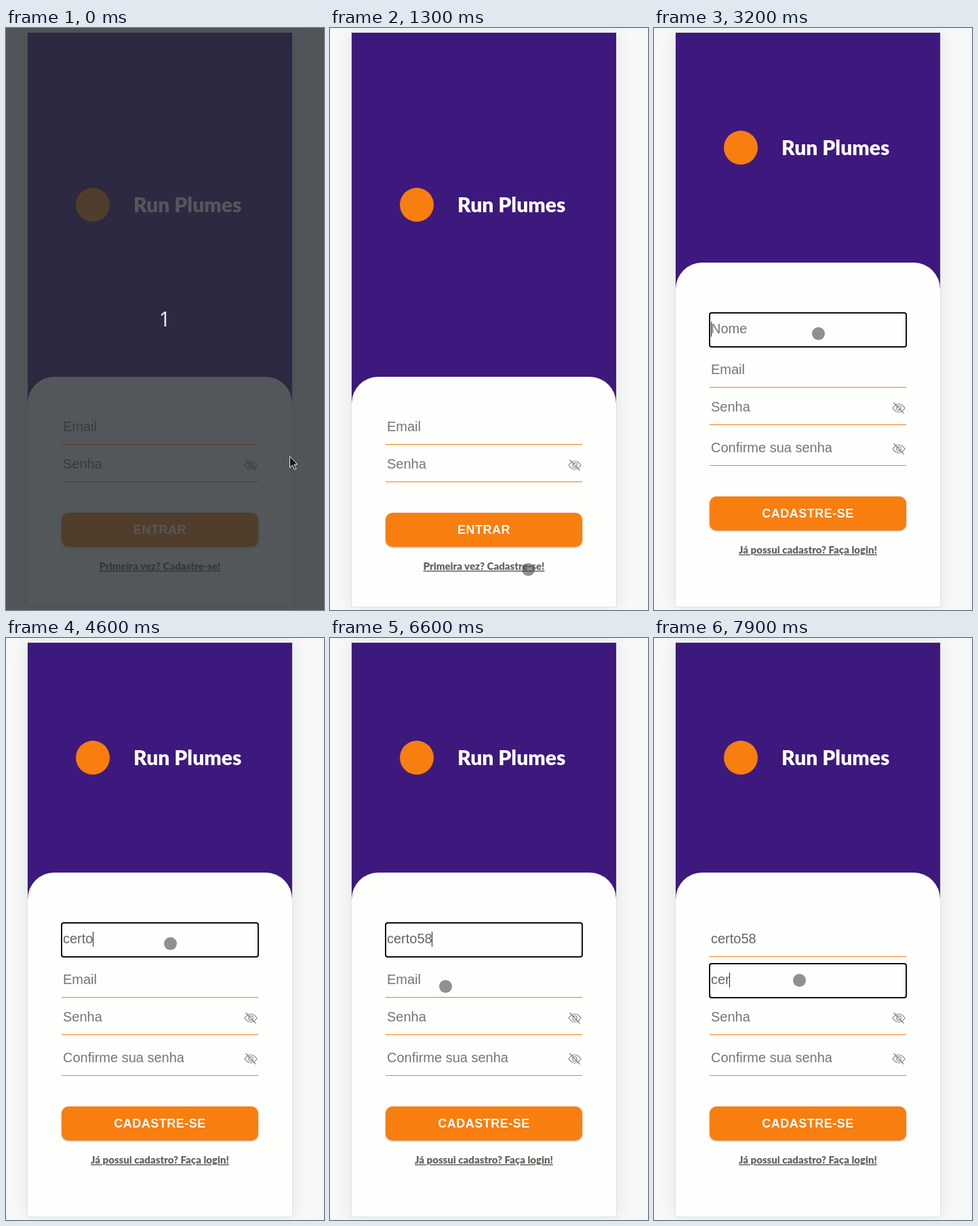
An HTML page that plays this animation: 469 by 856 pixels, repeating every 8 s.

```html
<!DOCTYPE html>
<html lang="pt-BR">
<head>
<meta charset="utf-8">
<title>Cadastro</title>
<style>
  html, body { margin: 0; width: 100%; height: 100%; overflow: hidden; background: #f7f9f8; }
  svg { display: block; width: 100vw; height: 100vh; }
  .phone { fill: #fefefd; stroke: #dfe1e0; filter: drop-shadow(0 0 12px rgba(0, 0, 0, .08)); }
  .purple { fill: #3d197d; }
  .card { fill: #fefefd; }
  .accent { fill: #f87e0f; }
  .button { fill: #f87e0f; filter: drop-shadow(0 1px 1px rgba(0, 0, 0, .35)); }
  .field { font: 20px "Liberation Sans", Arial, sans-serif; fill: #757575; }
  .field.filled { fill: #666460; }
  .label { font: bold 18px "Liberation Sans", Arial, sans-serif; letter-spacing: .5px; fill: #fff; }
  .title { font: 900 30px Lato, sans-serif; fill: #fff; }
  .link { font: 900 15px Lato, sans-serif; fill: #62645f; text-decoration: underline; }
  .label, .link { text-anchor: middle; }
  .eye { fill: none; stroke: #7c7c7c; stroke-width: 1.1; }
  .count { font: 30px "Noto Sans", sans-serif; fill: #e0e9f0; text-anchor: middle; }
  .ring { fill: #fefefd; stroke: #101010; stroke-width: 2; }
</style>
</head>
<body>
<svg viewBox="0 0 469 856">
  <defs>
    <g id="brand">
      <circle class="accent" cx="128" cy="260" r="25"/>
      <text class="title" x="188" y="271">Run Plumes</text>
    </g>
    <g id="eye" class="eye">
      <path d="M-9 0Q-5-6 0-6T9 0Q5 6 0 6T-9 0Z"/>
      <circle r="3.2"/>
      <path d="M-7.5-8 7.5 8"/>
    </g>
  </defs>
  <rect class="phone" x="31.5" y="6.5" width="391" height="845"/>
  <g id="login"></g>
  <g id="register"></g>
  <rect id="caret" width="1" height="22" fill="#222"/>
  <circle id="pointer" r="9.5" fill="#3c3e3c" fill-opacity=".57"/>
  <g id="cover">
    <rect width="469" height="856" fill="#292d33" fill-opacity=".8"/>
    <text class="count" x="234" y="439">1</text>
    <path d="M418.500 630v16.500l4-3.500 3 6.500 2.500-1-3-6.500h5z" fill="#15171a" stroke="#eee"/>
  </g>
</svg>
<script>
const LOOP = 8000, TICK = 100, LEFT = 84;
const $ = id => document.getElementById(id);

const fieldMarkup = ({ name, line, secret }) => `
  <rect class="accent" x="82" y="${line}" width="290" height="1"/>
  <rect class="ring" x="82" y="${line - 49}" width="290" height="50" rx="3" visibility="hidden"/>
  <text class="field" x="${LEFT}" y="${line - 19}">${name}</text>
  ${secret ? `<use href="#eye" x="361" y="${line - 24}"/>` : ''}`;

const screenMarkup = ({ top, brandShift, fields, buttonTop, action, link }) => `
  <rect class="purple" x="32" y="7" width="390" height="${top + 33}"/>
  <path class="card" d="M32 851V${top + 39}a39 39 0 0 1 39-39H383a39 39 0 0 1 39 39V851Z"/>
  <use href="#brand" y="${brandShift}"/>
  ${fields.map(fieldMarkup).join('')}
  <rect class="button" x="82" y="${buttonTop}" width="290" height="50" rx="10"/>
  <text class="label" x="227" y="${buttonTop + 31}">${action}</text>
  <text class="link" x="227" y="${buttonTop + 84}">${link}</text>`;

$('login').innerHTML = screenMarkup({
  top: 513, brandShift: 0, buttonTop: 713,
  fields: [{ name: 'Email', line: 612 }, { name: 'Senha', line: 667, secret: true }],
  action: 'ENTRAR', link: 'Primeira vez? Cadastre-se!'
});
$('register').innerHTML = screenMarkup({
  top: 345, brandShift: -84, buttonTop: 689,
  fields: [
    { name: 'Nome', line: 468 }, { name: 'Email', line: 528 },
    { name: 'Senha', line: 583, secret: true },
    { name: 'Confirme sua senha', line: 643, secret: true }
  ],
  action: 'CADASTRE-SE', link: 'Já possui cadastro? Faça login!'
});

// The pointer eases to each stop, arriving at its end time.
const origin = { x: 419.5, y: 631.5 };
const stops = [
  { end: 1000, time: 600, x: 288.5, y: 805.5 },
  { end: 1300, time: 200, x: 292.5, y: 796.5 },
  { end: 2400, time: 300, x: 275.5, y: 581.5 },
  { end: 2800, time: 200, x: 242.5, y: 449.5 },
  { end: 6100, time: 300, x: 157.5, y: 536.5 },
  { end: 6400, time: 200, x: 170.5, y: 512.5 },
  { end: 7500, time: 300, x: 214.5, y: 503.5 }
];
const inputs = [
  { focus: 3200, bursts: [{ text: 'certo', start: 3900, pace: 175 }, { text: '58', start: 5400, pace: 300 }] },
  { focus: 6700, bursts: [{ text: 'cer', start: 7700, pace: 100 }] }
];
const labels = [...$('register').querySelectorAll('.field')];
const rings = [...$('register').querySelectorAll('.ring')];
const placeholders = labels.map(label => label.textContent);

const clamp = u => Math.min(1, Math.max(0, u));
const ease = u => u * u * (3 - 2 * u);
const show = (node, on) => node.setAttribute('visibility', on ? 'visible' : 'hidden');

const pointerAt = t => stops.reduce((p, { end, time, x, y }) => {
  const u = ease(clamp((t - end + time) / time));
  return { x: p.x + (x - p.x) * u, y: p.y + (y - p.y) * u };
}, origin);

function typedAt({ focus, bursts }, t) {
  let value = '', lastKey = focus;
  for (const { text, start, pace } of bursts) {
    if (t < start) break;
    const count = Math.min(text.length, Math.floor((t - start) / pace) + 1);
    value += text.slice(0, count);
    lastKey = start + (count - 1) * pace;
  }
  return { value, lastKey };
}

const caretLit = idle => idle % 900 < 600;

function render(now) {
  const t = Math.floor(now % LOOP / TICK) * TICK;
  const registering = t >= 1800;
  show($('cover'), t < TICK);
  show($('pointer'), t >= TICK);
  $('login').style.display = registering ? 'none' : '';
  $('register').style.display = registering ? '' : 'none';

  const { x, y } = pointerAt(t);
  $('pointer').setAttribute('transform', `translate(${x} ${y})`);

  const focused = inputs.findLastIndex(input => t >= input.focus);
  show($('caret'), false);
  inputs.forEach((input, i) => {
    const { value, lastKey } = typedAt(input, t);
    labels[i].textContent = value || placeholders[i];
    labels[i].classList.toggle('filled', value !== '');
    show(rings[i], i === focused);
    if (i !== focused) return;
    const width = value ? labels[i].getComputedTextLength() : 0;
    $('caret').setAttribute('x', Math.floor(LEFT + width));
    $('caret').setAttribute('y', 432 + 60 * i);
    show($('caret'), caretLit(t - lastKey));
  });
}

let start;
function tick(now) {
  start ??= now;
  render(now - start);
  requestAnimationFrame(tick);
}
render(0);
requestAnimationFrame(tick);
</script>
</body>
</html>
```
